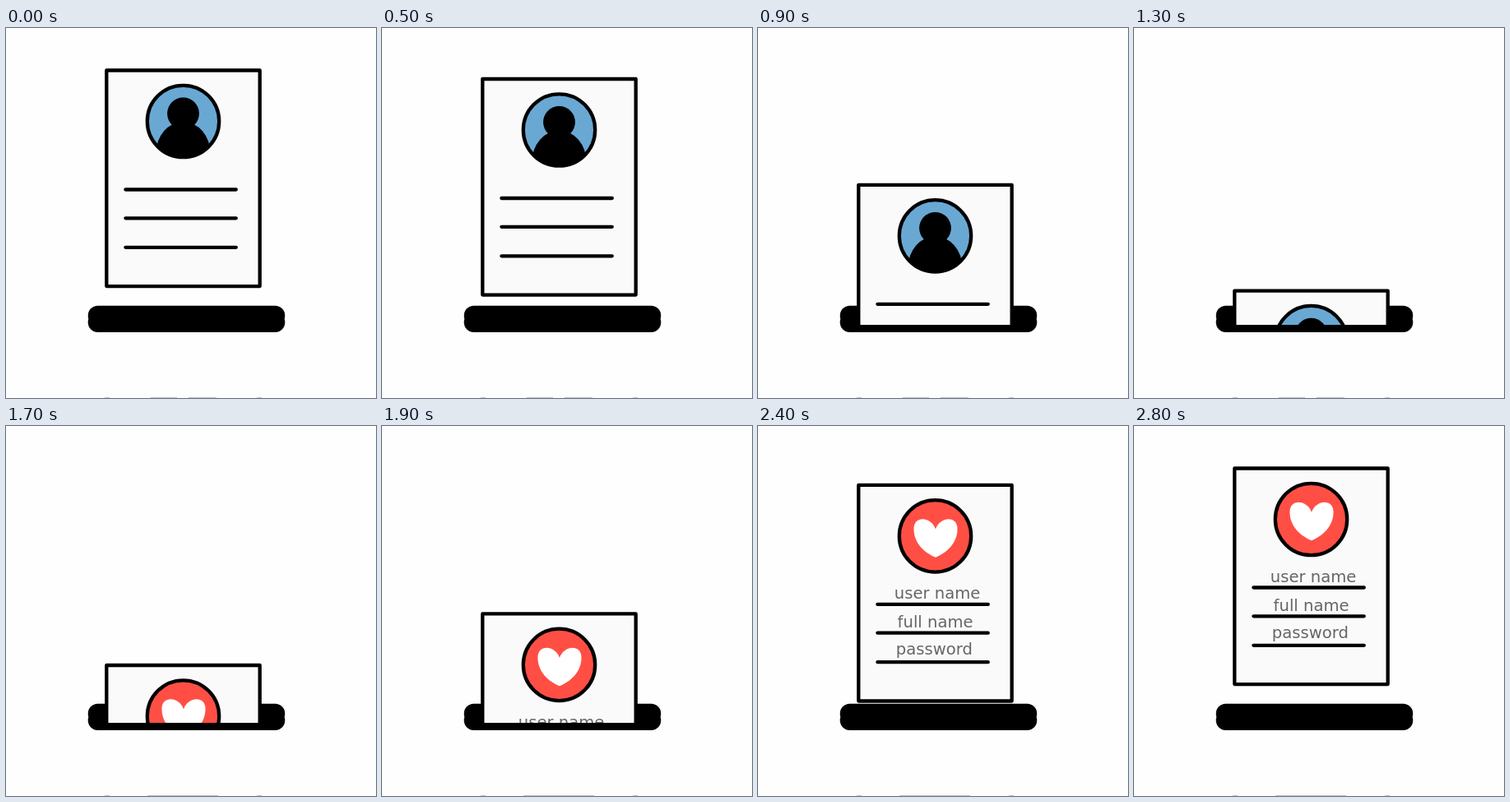
Recreate the animation shown at these times as an HTML page. Size 450x450 px, loop 3000 ms.

```html
<!DOCTYPE html>
<html lang="en">
<head>
<meta charset="utf-8">
<title>Profile card</title>
<style>
  html, body { margin: 0; width: 100%; height: 100%; overflow: hidden; background: #fefefe; }
  svg { display: block; width: 100vw; height: 100vh; }
  text { font: 19.6px "DejaVu Sans", Verdana, sans-serif; fill: #666; }
  .ink { stroke: #000; stroke-width: 4.3; stroke-linecap: round; stroke-linejoin: round; }
</style>
</head>
<body>
<svg viewBox="0 0 450 450">
  <defs>
    <clipPath id="above"><rect width="450" height="361"/></clipPath>
    <clipPath id="disc"><circle cx="215.5" cy="113.5" r="44"/></clipPath>
  </defs>
  <rect width="450" height="450" fill="#fefefe"/>

  <rect x="99.7" y="337.7" width="239.6" height="24" rx="12"/>
  <rect x="99.7" y="346" width="239.6" height="24" rx="12"/>

  <g clip-path="url(#above)">
    <g id="card">
      <rect class="ink" x="122.3" y="51.5" width="186.4" height="262.6" fill="#fafafa"/>
      <path class="ink" d="M145.4 196.5H279.8M145.4 231.3H279.8M145.4 266.8H279.8"/>
      <g id="blank">
        <circle cx="215.5" cy="113.5" r="43.7" fill="#6aa8d4"/>
        <g clip-path="url(#disc)">
          <circle cx="215.5" cy="104" r="19.4"/>
          <ellipse cx="215.5" cy="152" rx="33" ry="38"/>
        </g>
      </g>
      <g id="filled">
        <circle cx="215.5" cy="113.5" r="43.7" fill="#ff4f45"/>
        <path fill="#fff" d="M216 105C211 90 190 88 189.5 104C189 122 203 134 216 139.3C229 134 243 122 242.5 104C242 88 221 90 216 105Z"/>
        <text x="165.8" y="190">user name</text>
        <text x="169.6" y="224.5">full name</text>
        <text x="167.8" y="258">password</text>
      </g>
      <circle class="ink" cx="215.5" cy="113.5" r="43.7" fill="none"/>
    </g>
  </g>

  <g stroke="#000" stroke-opacity=".3">
    <path d="M120 449.7H126M305 449.7H311"/>
    <path id="edge"/>
  </g>
</svg>
<script>
  const LOOP = 3000, STEP = 100, SWAP = 1450, TOP = 51.5;
  const el = id => document.getElementById(id);
  const card = el('card'), blank = el('blank'), filled = el('filled'), edge = el('edge');
  const show = (node, on) => node.setAttribute('visibility', on ? 'visible' : 'hidden');

  // Top edge of the card: steady slide down, swap out of sight, steady slide up.
  const topAt = t => Math.max(TOP, t < SWAP
    ? 62 + 0.322 * (t - 500)
    : 291 - 0.313 * (t - 1700));

  function draw(ms) {
    const t = Math.floor((ms % LOOP) / STEP) * STEP;
    const y = t < 500 ? TOP : topAt(t);
    card.setAttribute('transform', `translate(0 ${(y - TOP).toFixed(2)})`);
    show(blank, t < SWAP);
    show(filled, t >= SWAP);
    edge.setAttribute('d', t < SWAP ? 'M176 449.7H208M222 449.7H256' : 'M172 449.7H258');
  }

  let start;
  function tick(now) {
    start ??= now;
    draw(Math.max(0, now - start));
    requestAnimationFrame(tick);
  }
  draw(0);
  requestAnimationFrame(tick);
</script>
</body>
</html>
```
